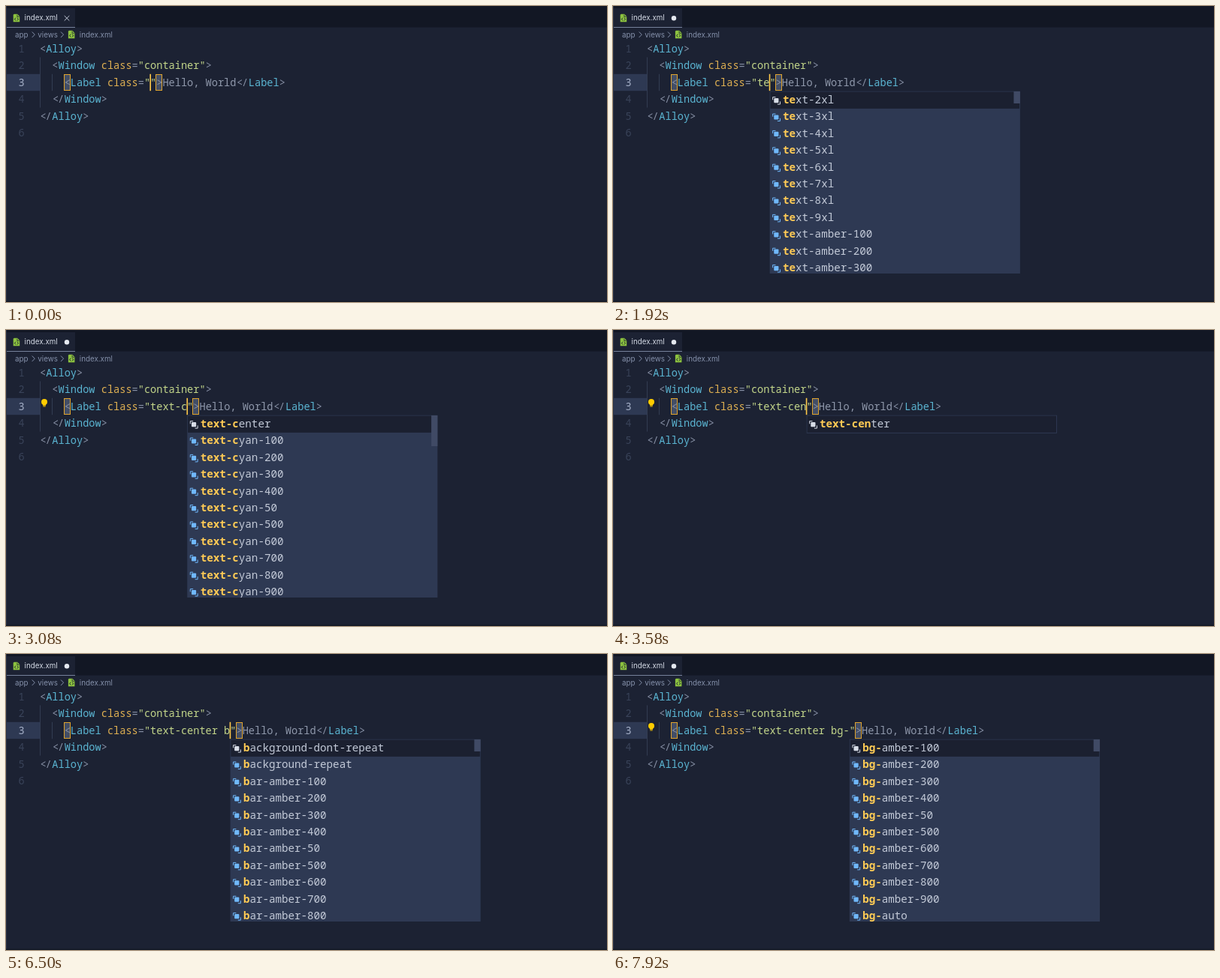
Animation, 800 px wide and 395 px high, one loop 8000 ms. Source, as an HTML page with a canvas:

```html
<!DOCTYPE html>
<html lang="en">
<head>
<meta charset="utf-8">
<title>Class name completion</title>
<style>
  html, body { margin: 0; width: 100%; height: 100%; overflow: hidden; background: #1c2233; }
  canvas { display: block; width: 800px; height: 395px; }
</style>
</head>
<body>
<canvas id="stage"></canvas>
<script>
const LOOP = 8000, LEFT = 45, TOP = 46, ROW = 22.4;
const CODE_SIZE = 13.62, ITEM_SIZE = 14.2, ADVANCE = 0.6, CHAR = CODE_SIZE * ADVANCE;
const POPUP_WIDTH = 333.5, POPUP_TOP = 113.5, POPUP_BOTTOM = 357;
const MONO = '"Noto Sans Mono", "DejaVu Sans Mono", monospace';
const UI = '9.8px Inter, "Open Sans", sans-serif';
const C = {
  back: '#1c2233', bar: '#121724', panel: '#2e3953', line: '#323c52', mark: '#434e66',
  punct: '#8790a5', tag: '#5bb5d2', attr: '#dfb052', string: '#c3d68a', text: '#8f98ab',
  item: '#c3cad8', match: '#ffcb55', number: '#394359', active: '#a3aec6',
  caret: '#ffc94a', bracket: '#e0a42e', green: '#8cc23f', blue: '#70b8fb', crumb: '#8490aa'
};

const shades = [100, 200, 300, 400, 50, 500, 600, 700, 800, 900];
const named = (prefix, values) => values.map(value => prefix + value);
const sizes = [...named('text-', [2, 3, 4, 5, 6, 7, 8, 9].map(n => n + 'xl')), ...named('text-amber-', shades)];
const cyans = ['text-center', ...named('text-cyan-', shades)];
const margins = named('-m-', [0, 1, 10, 11, 12, 14, 16, 2, 20, 24, 28]);
const bars = ['background-dont-repeat', 'background-repeat', ...named('bar-amber-', shades)];
const fills = [...named('bg-amber-', shades), 'bg-auto'];

// Each edit: time, attribute value, matched prefix, suggestions, popup delay
const edits = [
  { at: 0, value: '' },
  { at: 1750, value: 't' },
  { at: 1915, value: 'te', match: 'te', list: sizes },
  { at: 2080, value: 'tex', match: 'tex', list: sizes },
  { at: 2250, value: 'text', match: 'text', list: sizes },
  { at: 2420, value: 'text-', match: 'text-', list: sizes },
  { at: 2670, value: 'text-c', match: 'text-c', list: cyans, thumb: 41 },
  { at: 3165, value: 'text-ce', match: 'text-ce', list: ['text-center'] },
  { at: 3250, value: 'text-cen', match: 'text-cen', list: ['text-center'] },
  { at: 3830, value: 'text-center' },
  { at: 4330, value: 'text-center ', match: '', list: margins, delay: 85 },
  { at: 6330, value: 'text-center b', match: 'b', list: bars, delay: 85 },
  { at: 6830, value: 'text-center bg', match: 'bg', list: fills },
  { at: 7080, value: 'text-center bg-', match: 'bg-', list: fills }
];

const canvas = document.getElementById('stage');
const ctx = canvas.getContext('2d');
const ratio = window.devicePixelRatio || 1;
canvas.width = 800 * ratio;
canvas.height = 395 * ratio;
ctx.scale(ratio, ratio);

const column = n => LEFT + n * CHAR;
const middle = row => TOP + (row + 0.5) * ROW;

function rect(x, y, w, h, color) {
  ctx.fillStyle = color;
  ctx.fillRect(x, y, w, h);
}

function text(string, x, y, color, font) {
  ctx.font = font;
  ctx.fillStyle = color;
  ctx.fillText(string, x, y);
}

function stroke(points, color, width = 1) {
  ctx.beginPath();
  points.forEach(([x, y]) => ctx.lineTo(x, y));
  ctx.strokeStyle = color;
  ctx.lineWidth = width;
  ctx.stroke();
}

function code(string, x, y, color, size = CODE_SIZE, weight = 300) {
  text(string, x, y + 4.7, color, `${weight} ${size}px ${MONO}`);
}

// Draws [text, color] tokens in a row; "</" is set as a tight pair.
function codeLine(row, indent, tokens) {
  let col = indent;
  for (const [string, color] of tokens) {
    const x = column(col), y = middle(row);
    if (string === '</') {
      code('<', x + 0.6, y, color);
      code('/', x + CHAR - 0.6, y, color);
    } else {
      code(string, x, y, color);
    }
    col += string.length;
  }
}

const open = (name, attribute) => [
  ['<', C.punct], [name, C.tag],
  ...(attribute === undefined ? [] :
    [[' class', C.attr], ['=', C.punct], [`"${attribute}"`, C.string]]),
  ['>', C.punct]
];
const close = name => [['</', C.punct], [name, C.tag], ['>', C.punct]];

function fileIcon(x, y) {
  ctx.fillStyle = C.green;
  ctx.beginPath();
  ctx.moveTo(x + 1, y);
  ctx.lineTo(x + 5.5, y);
  ctx.lineTo(x + 8.5, y + 3.2);
  ctx.lineTo(x + 8.5, y + 10.5);
  ctx.lineTo(x, y + 10.5);
  ctx.lineTo(x, y + 1);
  ctx.fill();
  stroke([[x + 5.2, y + 0.8], [x + 5.2, y + 3.6], [x + 8, y + 3.6]], C.back, 0.8);
  stroke([[x + 3.3, y + 5], [x + 1.7, y + 6.8], [x + 3.3, y + 8.6]], C.back);
  stroke([[x + 5.2, y + 5], [x + 6.8, y + 6.8], [x + 5.2, y + 8.6]], C.back);
}

function header(dirty) {
  rect(0, 0, 800, 28.5, C.bar);
  rect(0, 3, 92, 25.5, C.back);
  rect(0, 28, 92, 1, '#76819a');
  fileIcon(9.7, 10.8);
  text('index.xml', 24.6, 19.4, '#d3d9e4', UI);
  if (dirty) {
    ctx.fillStyle = '#e4e8ef';
    ctx.beginPath();
    ctx.arc(81, 16.2, 3.2, 0, Math.PI * 2);
    ctx.fill();
  } else {
    stroke([[77.7, 13], [84.3, 19.6]], '#c3cad8');
    stroke([[84.3, 13], [77.7, 19.6]], '#c3cad8');
  }
  text('app', 12, 41.5, C.crumb, UI);
  text('views', 42.3, 41.5, C.crumb, UI);
  for (const x of [34.7, 73]) stroke([[x, 34.5], [x + 3.6, 38.2], [x, 41.9]], C.crumb);
  fileIcon(82.9, 32.7);
  text('index.xml', 97.8, 41.5, C.crumb, UI);
}

function bracketBox(col) {
  const x = Math.round(column(col)), y = Math.round(TOP + 2 * ROW);
  rect(x, y, 8, 22, C.mark);
  ctx.strokeStyle = C.bracket;
  ctx.lineWidth = 1;
  ctx.strokeRect(x - 0.5, y + 0.5, 8, 21);
}

function lightBulb() {
  ctx.fillStyle = '#ffcc00';
  ctx.beginPath();
  ctx.arc(51, 96, 4, 0, Math.PI * 2);
  ctx.fill();
  rect(49, 98.4, 4, 2.4, '#ffcc00');
  rect(49.3, 101.4, 3.4, 1, '#ffcc00');
}

function editor(value) {
  rect(0, TOP + 2 * ROW, LEFT, ROW, C.panel);
  for (let row = 0; row < 6; row++) {
    code(String(row + 1), 16.5, middle(row), row === 2 ? C.active : C.number);
  }
  rect(45, TOP + ROW, 1, 3 * ROW, C.line);
  rect(61, TOP + 2 * ROW, 1, ROW, C.line);
  bracketBox(4);
  bracketBox(19 + value.length);
  codeLine(0, 0, open('Alloy'));
  codeLine(1, 2, open('Window', 'container'));
  codeLine(2, 4, [...open('Label', value), ['Hello, World', C.text], ...close('Label')]);
  codeLine(3, 2, close('Window'));
  codeLine(4, 0, close('Alloy'));
}

function itemIcon(x, y, color) {
  ctx.fillStyle = color;
  ctx.beginPath();
  ctx.roundRect(x + 5.8, y - 2.8, 6.2, 6.2, 1);
  ctx.fill();
  stroke([[x + 4.2, y - 0.5], [x + 4.2, y - 4.2], [x + 8, y - 4.2]], color);
  stroke([[x + 10.5, y + 5.3], [x + 14, y + 5.3], [x + 14, y + 1.6]], color);
}

function popup(x, { list, match, thumb = 16 }) {
  const bottom = Math.min(POPUP_BOTTOM, POPUP_TOP + list.length * ROW + 2);
  const height = bottom - POPUP_TOP;
  ctx.save();
  ctx.beginPath();
  ctx.rect(x, POPUP_TOP, POPUP_WIDTH, height);
  ctx.clip();
  rect(x, POPUP_TOP, POPUP_WIDTH, height, C.panel);
  rect(x + 1, POPUP_TOP + 1, POPUP_WIDTH - 2, ROW, '#1b2030');
  list.slice(0, 11).forEach((item, i) => {
    const y = 125.2 + i * ROW, textX = x + 17.6;
    const restX = textX + match.length * ITEM_SIZE * ADVANCE;
    itemIcon(x, y + 0.6, i ? C.blue : '#d7dce6');
    code(match, textX, y, C.match, ITEM_SIZE, 700);
    code(item.slice(match.length), restX, y, C.item, ITEM_SIZE);
  });
  if (list.length > 1) rect(x + POPUP_WIDTH - 8.5, POPUP_TOP + 0.5, 8.5, thumb, '#404a65');
  ctx.restore();
}

function draw(time) {
  const edit = edits.findLast(step => step.at <= time);
  const age = time - edit.at;
  const caretX = column(18 + edit.value.length);
  rect(0, 0, 800, 395, C.back);
  header(edit.value !== '');
  editor(edit.value);
  if (edit.at >= 2000 && age >= 300) lightBulb();
  if (age % 1000 < 500) rect(caretX - 0.7, TOP + 2 * ROW, 1.6, ROW, C.caret);
  if (edit.list && age >= (edit.delay || 0)) popup(caretX, edit);
  rect(0, 0, 1, 395, '#2a3245');
  rect(0, 393.5, 800, 1.5, '#131825');
}

function frame(now) {
  draw(now % LOOP);
  requestAnimationFrame(frame);
}
requestAnimationFrame(frame);
</script>
</body>
</html>
```
